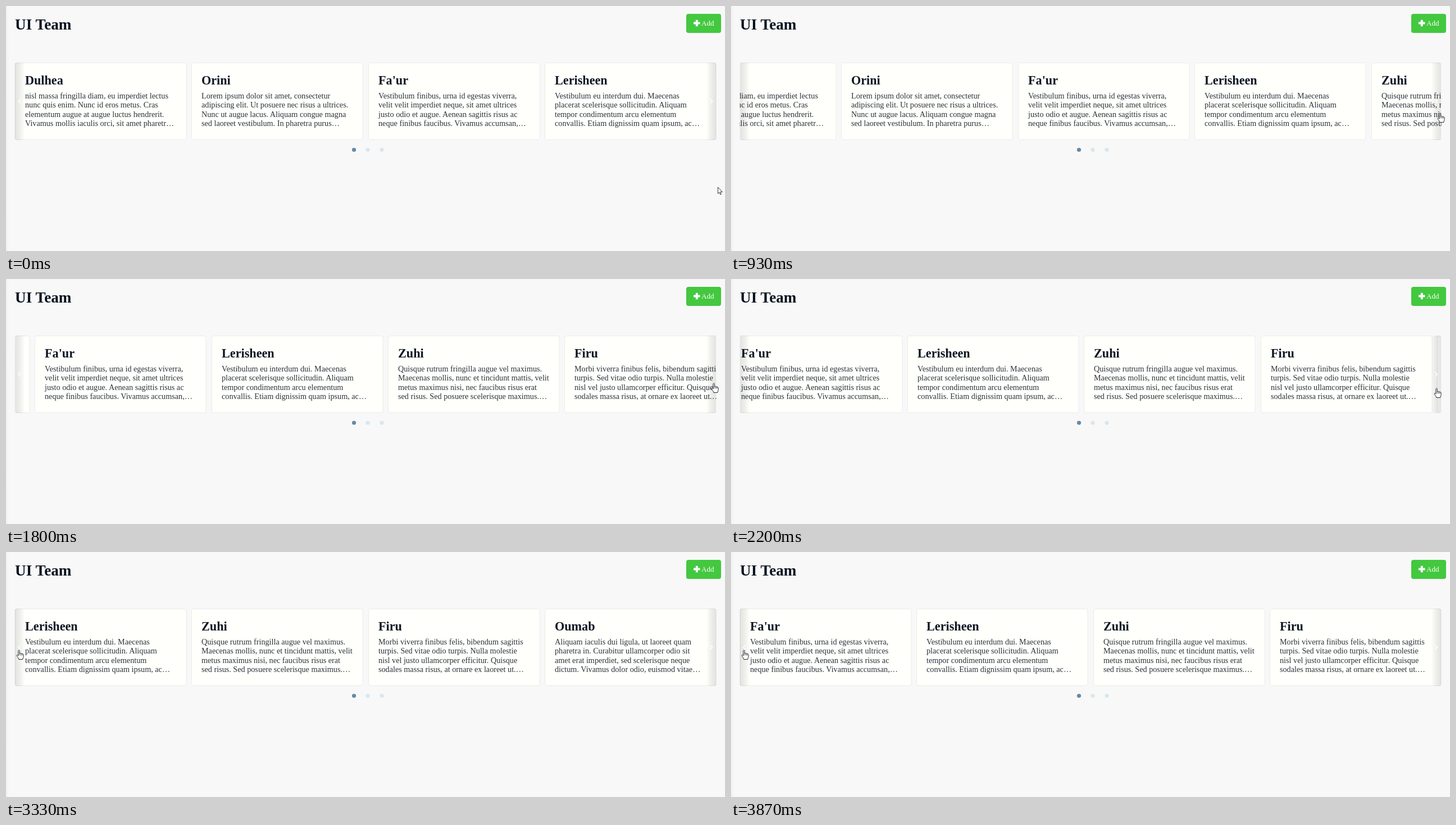
Write an HTML page that moves like this. It is 1280 px wide and 437 px high and loops after 3.99 s.

```html
<!DOCTYPE html>
<html lang="en">
<head>
<meta charset="utf-8">
<title>UI Team</title>
<style>
  html, body { margin: 0; width: 100%; height: 100%; overflow: hidden; background: #f8f8f8; }
  svg { display: block; width: 1280px; height: 437px; font-family: "Liberation Serif", "Times New Roman", serif; }
  .title { font-size: 27.2px; font-weight: bold; fill: #07111f; }
  .name { font-size: 22.2px; font-weight: bold; fill: #0b1523; }
  .line { font-size: 14.2px; fill: #2b313c; }
  .card { fill: #fffffb; stroke: #ebebe9; }
  .chevron { fill: none; stroke: #fff; stroke-width: 1.6; }
  .cursor path { fill: #fff; stroke: #20242c; stroke-linejoin: round; stroke-linecap: round; }
</style>
</head>
<body>
<svg viewBox="0 0 1280 437">
  <defs>
    <linearGradient id="shade">
      <stop offset="0" stop-color="#000" stop-opacity=".11"/>
      <stop offset=".45" stop-color="#000" stop-opacity=".075"/>
      <stop offset="1" stop-color="#000" stop-opacity="0"/>
    </linearGradient>
    <linearGradient id="edge">
      <stop offset="0" stop-color="#f1f1f1"/>
      <stop offset="1" stop-color="#f8f8f8"/>
    </linearGradient>
    <clipPath id="window"><rect x="15.5" y="101" width="1249" height="138" rx="4"/></clipPath>
  </defs>

  <rect width="1280" height="437" fill="#f8f8f8"/>
  <rect width="6" height="437" fill="url(#edge)"/>
  <text class="title" x="16" y="41.5">UI Team</text>

  <rect x="1211" y="14" width="62" height="34" rx="4" fill="#43c83f"/>
  <path d="M1224 30.5h11.6M1229.8 24.7v11.6" stroke="#fff" stroke-width="3.8"/>
  <text x="1238" y="35.3" font-size="13" fill="#fff">Add</text>

  <g clip-path="url(#window)">
    <g id="cards"></g>
    <rect x="15.5" y="101" width="18" height="138" fill="url(#shade)"/>
    <rect x="15.5" y="101" width="18" height="138" fill="url(#shade)" transform="matrix(-1 0 0 1 1280 0)"/>
    <path class="chevron" d="M26 166l-4 4 4 4M1253.5 166l4 4-4 4"/>
  </g>

  <circle cx="619.5" cy="256.5" r="3.6" fill="#648aa7"/>
  <circle cx="644" cy="256.5" r="3.6" fill="#d9e6ef"/>
  <circle cx="669" cy="256.5" r="3.6" fill="#d9e6ef"/>

  <g id="cursor" class="cursor">
    <path id="arrow" stroke-width=".9" d="M.4.5V11.6L2.9 9.3 4.7 13.4 6.3 12.7 4.6 8.7H8Z"/>
    <g id="hand" stroke-width="1">
      <path d="M-1.2 1.2C-1.2-.3 1.2-.3 1.2 1.2V6C1.6 5 3.5 5.2 3.6 6.4 4.2 5.5 5.8 5.9 5.9 7 6.6 6.3 8.1 6.9 8.1 8.2V11.5C8.1 13.4 6.9 14.2 6.7 16.6H-.2C-.4 14.4-2.5 12.4-3.7 10.2-4.3 8.8-2.8 8-1.9 9L-1.2 9.8Z"/>
      <path d="M1.2 6v3M3.6 6.5v2.6M5.9 7v2.4" stroke-width=".8"/>
    </g>
    <path id="beam" style="fill:none" stroke-width="1.1" d="M-2-5.5Q0-5.5 0-4.5 0-5.5 2-5.5M0-4.5V5M-2 6Q0 6 0 5 0 6 2 6"/>
  </g>
</svg>

<script>
const LOOP = 3990, STEP = 200 / 3, LAST_STEP = 58;
const PITCH = 314.4, SLIDE = 400;

const people = [
  ["Dulhea", "nisl massa fringilla diam, eu imperdiet lectus", "nunc quis enim. Nunc id eros metus. Cras",
    "elementum augue at augue luctus hendrerit.", "Vivamus mollis iaculis orci, sit amet pharetr…"],
  ["Orini", "Lorem ipsum dolor sit amet, consectetur", "adipiscing elit. Ut posuere nec risus a ultrices.",
    "Nunc ut augue lacus. Aliquam congue magna", "sed laoreet vestibulum. In pharetra purus…"],
  ["Fa'ur", "Vestibulum finibus, urna id egestas viverra,", "velit velit imperdiet neque, sit amet ultrices",
    "justo odio et augue. Aenean sagittis risus ac", "neque finibus faucibus. Vivamus accumsan,…"],
  ["Lerisheen", "Vestibulum eu interdum dui. Maecenas", "placerat scelerisque sollicitudin. Aliquam",
    "tempor condimentum arcu elementum", "convallis. Etiam dignissim quam ipsum, ac…"],
  ["Zuhi", "Quisque rutrum fringilla augue vel maximus.", "Maecenas mollis, nunc et tincidunt mattis, velit",
    "metus maximus nisi, nec faucibus risus erat", "sed risus. Sed posuere scelerisque maximus.…"],
  ["Firu", "Morbi viverra finibus felis, bibendum sagittis", "turpis. Sed vitae odio turpis. Nulla molestie",
    "nisl vel justo ullamcorper efficitur. Quisque", "sodales massa risus, at ornare ex laoreet ut.…"],
  ["Oumab", "Aliquam iaculis dui ligula, ut laoreet quam", "pharetra in. Curabitur ullamcorper odio sit",
    "amet erat imperdiet, sed scelerisque neque", "dictum. Vivamus dolor odio, euismod vitae…"]
];

// Slide start time and direction
const clicks = [[870, 1], [1570, 1], [2195, 1], [3378, -1]];

// Pointer path: time, x, y
const path = [
  [0, 1267, 323], [530, 1266, 206], [930, 1262, 191.5], [1330, 1260, 185.5],
  [1930, 1260, 185.5], [2200, 1256, 195], [2600, 129, 187], [2870, 4, 180],
  [3150, 21, 177], [3400, 23, 174.5], [LOOP, 23, 174.5]
];

const byId = id => document.getElementById(id);
const clamp01 = v => Math.min(1, Math.max(0, v));
const smooth = v => v * v * (3 - 2 * v);

const cards = people.map(([name, ...lines]) => {
  const g = document.createElementNS("http://www.w3.org/2000/svg", "g");
  g.innerHTML = `<rect class="card" x=".5" y="101.5" width="304.5" height="137" rx="3.5"/>
    <text class="name" x="18" y="139.8">${name}</text>` +
    lines.map((s, i) => `<text class="line" x="18" y="${165 + i * 16.33}">${s}</text>`).join("");
  byId("cards").append(g);
  return g;
});

// cubic-bezier(0, 0, .2, 1)
function decelerate(x) {
  let lo = 0, hi = 1;
  for (let i = 0; i < 20; i++) {
    const s = (lo + hi) / 2;
    if (0.6 * s * s + 0.4 * s ** 3 < x) lo = s; else hi = s;
  }
  return smooth(hi);
}

function pointerAt(t) {
  const i = Math.max(1, path.findIndex(p => p[0] >= t));
  const [t0, x0, y0] = path[i - 1], [t1, x1, y1] = path[i];
  const k = smooth(clamp01((t - t0) / (t1 - t0)));
  return [x0 + (x1 - x0) * k, y0 + (y1 - y0) * k];
}

function pointerKind(x, y) {
  if (x < 16 || x > 1264 || y < 101 || y > 238) return "arrow";
  if (x < 34 || x > 1247) return "hand";
  return y > 152 && y < 217 ? "beam" : "arrow";
}

function draw(t) {
  const index = clicks.reduce((sum, [start, dir]) =>
    t > start ? sum + dir * decelerate(clamp01((t - start) / SLIDE)) : sum, 0);
  cards.forEach((card, i) =>
    card.setAttribute("transform", `translate(${16 + Math.round((i - index) * PITCH)} 0)`));

  const [x, y] = pointerAt(t).map(Math.round);
  const kind = pointerKind(x, y);
  byId("cursor").setAttribute("transform", `translate(${x} ${y})`);
  for (const id of ["arrow", "hand", "beam"]) byId(id).style.display = id === kind ? "" : "none";
}

const begin = performance.now();
function tick() {
  const t = (performance.now() - begin) % LOOP;
  draw(Math.min(LAST_STEP, Math.floor((t + 4) / STEP)) * STEP);
  requestAnimationFrame(tick);
}
tick();
</script>
</body>
</html>
```
